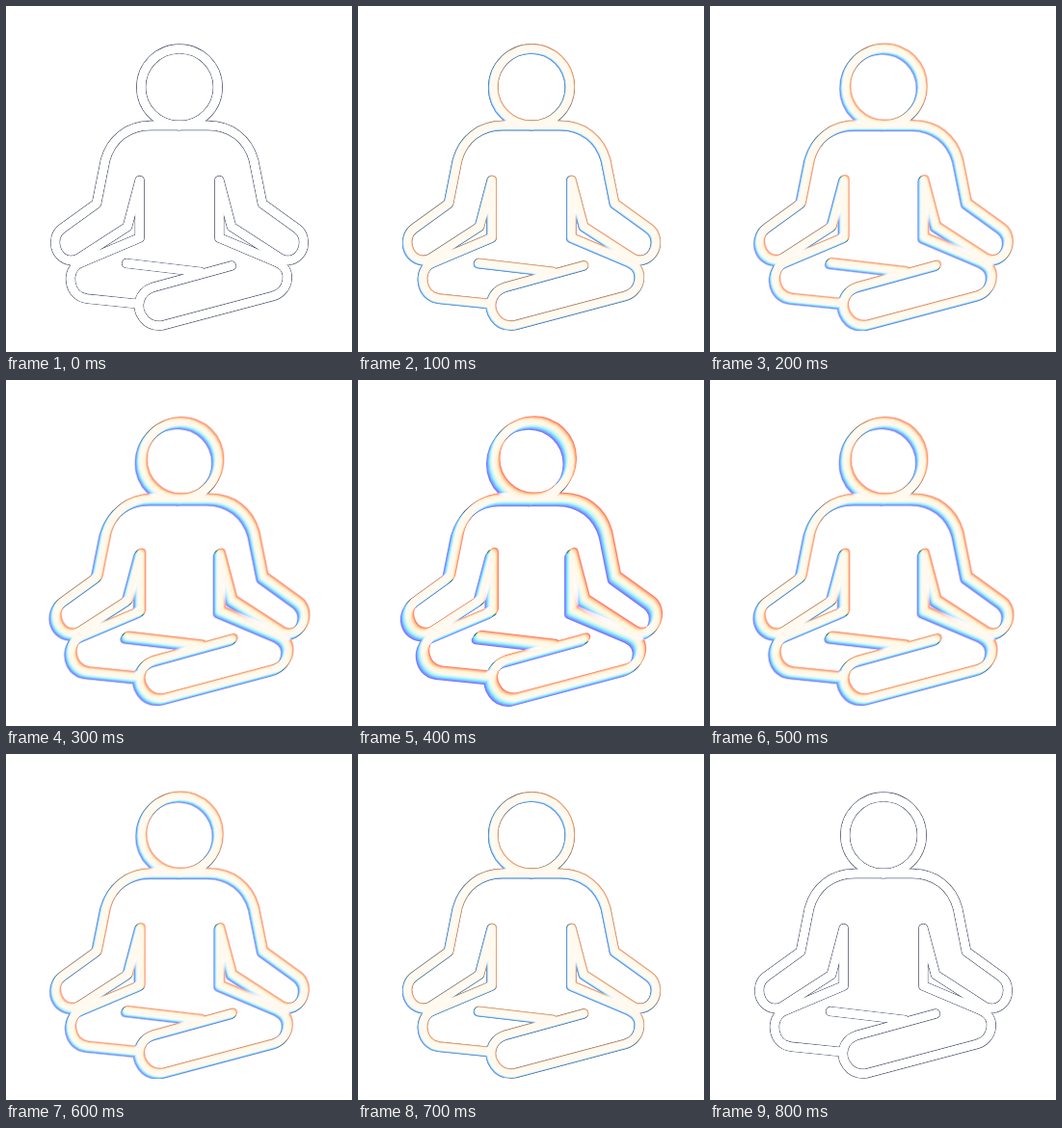
Animation, 359 px wide and 359 px high, one loop 0.9 s. Source, as an HTML page:

```html
<!DOCTYPE html>
<html lang="en">
<head>
<meta charset="utf-8">
<title>Meditation</title>
<style>
  html, body { margin: 0; width: 100%; height: 100%; overflow: hidden; background: #fff; }
  svg { display: block; width: 100vw; height: 100vh; }
  #figure { fill: none; stroke-linecap: round; stroke-linejoin: round; }
  .rim { stroke: #686187; stroke-width: 10.3px; }
  .split { isolation: isolate; }
  .split use {
    stroke-width: 8.5px;
    mix-blend-mode: screen;
    animation: spread 900ms step-end infinite;
  }
  .core { stroke: #fff; stroke-width: 8.5px; animation: core 900ms step-end infinite; }
  .tint { stroke: #fff3cf; stroke-width: 7px; animation: tint 900ms step-end infinite; }

  /* --i runs from 1 (up right) to -1 (down left) */
  @keyframes spread {
    0%, 88.888%, 100% { transform: translate(0, 0); }
    11.111%, 77.777% { transform: translate(calc(var(--i) * .8px), calc(var(--i) * -.8px)); }
    22.222%, 66.666% { transform: translate(calc(var(--i) * 1.6px), calc(var(--i) * -1.6px)); }
    33.333%, 55.555% { transform: translate(calc(var(--i) * 2.3px), calc(var(--i) * -2.3px)); }
    44.444% { transform: translate(calc(var(--i) * 3px), calc(var(--i) * -3px)); }
  }
  @keyframes core {
    0%, 88.888%, 100% { opacity: 1; }
    11.111%, 22.222%, 33.333%, 44.444%, 55.555%, 66.666%, 77.777% { opacity: 0; }
  }
  @keyframes tint {
    0%, 88.888%, 100% { opacity: 0; }
    11.111%, 22.222%, 33.333%, 44.444%, 55.555%, 66.666%, 77.777% { opacity: .3; }
  }
</style>
</head>
<body>
<svg viewBox="0 0 359 359">
  <defs>
    <g id="arm">
      <path d="M180 124H150C127 124 109 138 103 160L94 205L58 231C46 240 50 262 67 264Q71 264 75 262L126 229L138.7 181V240.5L76 267"/>
    </g>
    <g id="figure">
      <circle cx="180" cy="84.2" r="39.8"/>
      <use href="#arm"/>
      <use href="#arm" transform="matrix(-1 0 0 1 360 0)"/>
      <path d="M76 267C62 274 64 301 84 303.7L136 309"/>
      <path d="M125 267L202 276"/>
      <path d="M234 269.5L152 292C138 297 134 312 142 323Q149 333 162 331.5L277 301C294 296 297 274 283 267"/>
    </g>
  </defs>
  <use class="rim" href="#figure"/>
  <g class="split">
    <use href="#figure" stroke="rgb(255,125,110)" style="--i:1"/>
    <use href="#figure" stroke="rgb(150,128,50)" style="--i:.667"/>
    <use href="#figure" stroke="rgb(90,120,90)" style="--i:.333"/>
    <use href="#figure" stroke="rgb(30,160,110)" style="--i:0"/>
    <use href="#figure" stroke="rgb(0,142,100)" style="--i:-.333"/>
    <use href="#figure" stroke="rgb(0,79,60)" style="--i:-.667"/>
    <use href="#figure" stroke="rgb(125,118,255)" style="--i:-1"/>
  </g>
  <use class="core" href="#figure"/>
  <use class="tint" href="#figure"/>
</svg>
</body>
</html>
```
